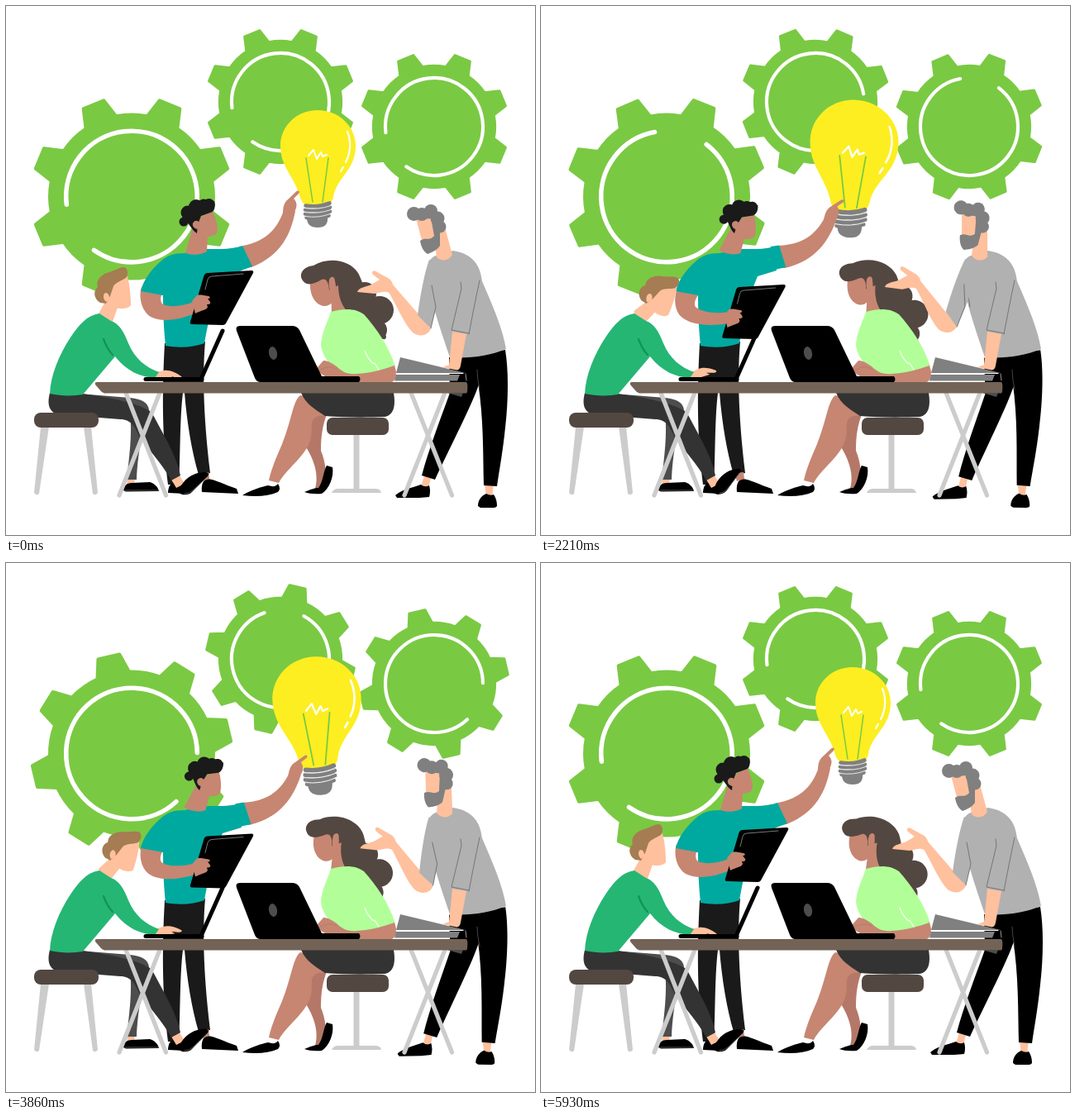
Write an HTML page with a canvas that moves like this. It is 640 px wide and 640 px high and loops after 6000 ms.

```html
<!DOCTYPE html>
<html lang="en">
<head>
<meta charset="utf-8">
<title>Team idea</title>
<style>
  html, body { margin: 0; width: 100%; height: 100%; overflow: hidden; background: #fff; }
  canvas { display: block; width: 640px; height: 640px; }
</style>
</head>
<body>
<canvas id="stage"></canvas>
<script>
const LOOP = 6000, FRAMES = 84, LAST = FRAMES - 1;
const GREEN = '#7ac943', TEAL = '#00a99f', SHIRT = '#25b674', LIME = '#b2ff99';
const DARK = '#c68672', DEEP = '#b57868', LIGHT = '#ffc09d';
const GREY = '#808080', CLOTH = '#b1b1b1', METAL = '#cccccc', BROWN = '#534741';
const TAU = Math.PI * 2, rad = d => d * Math.PI / 180;

const canvas = document.getElementById('stage');
const g = canvas.getContext('2d');
const dpr = window.devicePixelRatio || 1;
canvas.width = canvas.height = 640 * dpr;

// pose values are given at these steps and joined linearly
const KEYS = [0, 11, 21, 31, 45, 63, 83];
let step = 0;
function pose(...v) {
  let i = 0;
  while (i < KEYS.length - 2 && step > KEYS[i + 1]) i++;
  return v[i] + (v[i + 1] - v[i]) * (step - KEYS[i]) / (KEYS[i + 1] - KEYS[i]);
}

const paths = {};
const path = d => paths[d] || (paths[d] = new Path2D(d));
function fill(color, d) {
  g.fillStyle = color;
  g.fill(path(d));
}
function line(color, width, d) {
  g.strokeStyle = color;
  g.lineWidth = width;
  g.lineCap = g.lineJoin = 'round';
  g.stroke(path(d));
}
function dots(color, ...list) {
  g.fillStyle = color;
  for (const [x, y, r] of list) {
    g.beginPath();
    g.arc(x, y, r, 0, TAU);
    g.fill();
  }
}
function turn(x, y, deg, draw, scale = 1) {
  g.save();
  g.translate(x, y);
  g.rotate(rad(deg));
  g.scale(scale, scale);
  g.translate(-x, -y);
  draw();
  g.restore();
}
function shift(x, y, draw) {
  g.save();
  g.translate(x, y);
  draw();
  g.restore();
}

function gear(x, y, size, dir) {
  g.save();
  g.translate(x, y);
  g.scale(size, size);
  g.rotate(dir * TAU * step / LAST);
  g.beginPath();
  for (let i = 0; i < 8; i++) {
    const mid = rad(22.5 + i * 45);
    const at = (r, off) => g.lineTo(r * Math.cos(mid + rad(off)), r * Math.sin(mid + rad(off)));
    at(99, -11.5);
    at(121, -6.3);
    at(121, 6.3);
    at(99, 11.5);
    g.arc(0, 0, 99, mid + rad(11.5), mid + rad(33.5));
  }
  g.closePath();
  g.fillStyle = g.strokeStyle = GREEN;
  g.lineJoin = g.lineCap = 'round';
  g.lineWidth = 4;
  g.fill();
  g.stroke();
  g.beginPath();
  g.arc(0, 0, 79.3, rad(173), rad(125 + 360));
  g.strokeStyle = '#fff';
  g.lineWidth = 5.6;
  g.stroke();
  g.restore();
}

function bulb() {
  fill('#fcee21', 'M377 126C403 126 423 146 423 169C423 199 400 207 396 231C394 241 386 243 377 243C367 243 359 242 356 232C350 207 332 196 332 169C332 146 351 126 377 126Z');
  line(GREEN, 1.5, 'M363 184L371 237M390 184L383 237');
  line('#fff', 2, 'M366 181L372 174L376 185L381 177L383 182L388 180');
  line('#fff', 2.2, 'M413 152C417 162 418 176 411 189M408 195L405 200');
  fill(GREY, 'M364 256L389 254C390 264 386 268 377 268C368 268 364 264 364 256Z');
  line(GREY, 4.6, 'M362.5 241.5Q378 244 391.5 238.5M362 246.5Q378 249 392 243.5M362 251.5Q378 254 392 248.5M363.5 256Q378 258.5 390.5 253.5');
  line('#fff', 0.8, 'M361 244.5Q378 247 393 241.5M361 249.5Q378 252 393 246.5M362 254.5Q378 257 392 251.5');
}

function pointingArm() {
  turn(290, 304, pose(0, -2, 0, 8.5, 14, 1, 0), () => {
    fill(DARK, 'M280 294L287 290C312 285 328 272 336 247L350 248C345 275 333 302 297 316L284 318Z');
    turn(343, 246, pose(0, -14, -13, 2, 6, -6, 0), () =>
      fill(DARK, 'M335 252C335 244 336 239 340 235L351 224.5C354 222 356 225 354 227L348 233C352 237 353 242 349 249L346 256Z'));
    fill(TEAL, 'M276 293L286 290L298 315L282 321Z');
  });
}

function presenter() {
  fill('#1a1a1a', 'M192 408L241 406C238 440 238 490 247 565L233 567C225 540 219 505 216 468L214 468C210 500 211 550 209 579L196 579C190 530 188 480 192 408Z');
  fill('#000', 'M237 588C236 580 238 574 243 572C254 573 264 579 279 584L281 590Z');
  fill(DARK, 'M234 565L245 564L246 572L237 575Z');
  fill('#000', 'M196 589C196 582 199 577 204 576L214 579L216 590Z');

  fill(TEAL, 'M216 299C203 299 194 302 186 310C175 320 166 332 163 345L190 350C190 372 191 393 193 411C209 414 227 413 240 408C245 380 252 350 262 327L285 320L279 292C268 294.500 255 294 243 294Z');

  turn(232, 290, pose(0, 8, 11, 11.5, 12, 12, 0), () => {
    fill(DARK, 'M226 268L217 299C226 302 237 301 243 297L244 278Z');
    fill(DARK, 'M229 260L249 247C253 255 256 264 256 271C256 277 249 279 243 279L232 276Z');
    dots('#1a1a1a', [215, 261, 5.5], [220, 250, 8.5], [230, 243, 9], [239, 240, 6.5], [245.5, 240, 7]);
    fill('#1a1a1a', 'M213 256C222 262 224 271 231 275L232 264L236 254L247 250C252 249 254 243 252 236L230 236Z');
    fill(DARK, 'M226 263C225 266 228 270 232 270L234 262C231 258 227 260 226 263Z');
  });

  const drop = pose(0, 6, 11, 17, 11, 4, 0);
  turn(174, 352, drop * 0.82, () =>
    fill(DARK, 'M164 340C160 352 164 369 175 376C190 384 212 379 231 371L227 358C214 363 199 365 190 361C186 358 187 352 189 346Z'));
  fill(TEAL, 'M163 345L190 350L200 320L180 317C172 325 166 335 163 345Z');
  line('#000', 5, 'M262 393L237 449');
  shift(pose(0, -1, -2, -3.5, -1, 1, 0), drop, () => {
    fill('#000', 'M244 323L297 320Q300 320 299 323L266 384Q265 386 262 386L225 385Q222 385 223 382L239 328Q240 323 244 323Z');
    line('#777', 1, 'M241 343L244 331Q245 327 249 327L287 324');
    fill(DARK, 'M225 357L231 350C234 349 239 350 245 351C248 352 247 354 244 354L247 358C248 361 245 361 243 361L244 364C243 368 236 368 229 372Z');
  });
}

function stoolLeft() {
  fill(METAL, 'M42 509L52 509L40 590Q37 593 34 589ZM94 509L103 509L111 589Q108 593 105 590Z');
}

function sitter() {
  fill(LIGHT, 'M147 571L156 571L155 580L146 580Z');
  fill('#000', 'M142 586C142 580 147 577 152 577L174 576C180 578 184 582 185 587L145 587.5Z');
  line('#777', 0.7, 'M144 586L184 586');
  fill('#4d4d4d', 'M88 469L150 474Q172 476 173 489C165 510 159 545 158 573L146 573C149 545 153 520 150 490Z');
  fill(LIGHT, 'M200 573L210 568L216 578L206 583Z');
  turn(213, 588, pose(0, -4, -8, -9, -2, 1, 0), () => {
    fill('#000', 'M209 589L212 580C218 570 229 564 240 564Q248 564 244 569L225 588Q221 592 213 591Z');
    line('#777', 0.7, 'M216 590Q222 590 226 586L243 570');
  });
  fill('#333', 'M53 468C50 480 51 490 62 494L138 500C152 500 156 510 162 522C175 540 189 554 200 574L211 568C206 543 190 518 176 491C160 481 130 474 92 469Z');
  g.fillStyle = BROWN;
  g.beginPath();
  g.roundRect(34, 492, 78, 18, 8);
  g.fill();

  turn(124, 375, pose(0, 8, 15.5, 24, 26, 12.5, 0), () => {
    fill(LIGHT, 'M121 356L111 374C115 382 123 385 129 382L136 362Z');
    fill(LIGHT, 'M124 338L147 327C150 340 151 352 151 362C148 366 139 368 131 364L120 356Z');
    fill('#a67c52', 'M114 359C106 354 105 345 111 340C108 332 116 324 125 322C134 319 138 316 143 316C148 318 148 325 145 329C139 333 133 334 130 339L126 351L121 360Z');
    fill(LIGHT, 'M119 348C121 345 126 349 125 355L121 358C118 355 117 351 119 348Z');
  });
  turn(184, 447, pose(0, -15, -15, -15, -15, -1, 0), () =>
    fill(LIGHT, 'M179 443L191 441C198 440 205 443 212 448C214 450 211 451 208 450L200 448L204 451L178 452Z'));
  fill(SHIRT, 'M113 372C98 374 88 386 78 401C64 422 54 447 53 469C67 472 81 472 93 470L132 424C146 442 163 449 180 450L185 443C169 437 156 427 148 408C143 395 137 384 127 381Z');
  line('#139355', 2.2, 'M118 403C121 411 124 417 129 422');
}

function womanLegs() {
  fill(DEEP, 'M370 496C360 510 357 522 362 532C372 548 379 566 374 584L384 586C389 570 387 552 381 538C381 520 383 508 388 494Z');
  fill('#000', 'M361 588C368 585 374 583 378 583C384 575 384 562 388 556L395 558C397 570 391 584 382 590Q369 591 361 588Z');
  fill(DARK, 'M356 471C347 478 346 500 334 530C327 546 321 560 318 574L330 577C339 560 362 545 368 526C373 510 365 500 378 496L392 495L375 475Z');
  fill('#000', 'M286 592C297 585 309 582 317 580Q326 583 329 578Q333 584 329 588C318 593 303 594 286 592Z');
  fill('#333', 'M357 468C363 482 374 488 386 496C408 498 437 498 458 497C471 495 471 480 469 468Z');
  line(METAL, 7, 'M424 520L424 584');
  fill(METAL, 'M394 589Q396 584 402 584L447 584Q453 584 454 589Z');
  g.fillStyle = BROWN;
  g.beginPath();
  g.roundRect(388, 498, 75, 21, 7);
  g.fill();
}

function woman() {
  turn(402, 365, pose(0, 2.2, 3.6, 5.5, 7, 9.5, 10), () => {
    dots(BROWN, [452, 368, 17], [449, 392, 12], [434, 348, 14], [428, 366, 17]);
    fill(BROWN, 'M357 328C356 319 364 315 372 314C390 303 416 307 426 323C431 332 431 340 440 345L455 385L460 400Q460 405 453 402C433 395 418 381 411 368L398 350Z');
    fill(DARK, 'M393 342L394 372L411 368C405 359 402 350 402 338Z');
    fill(DARK, 'M368 334C367 350 374 361 384 363C392 364 398 357 399 346L394 326Z');
    fill(BROWN, 'M357 328C361 340 371 337 380 332C386 328 390 332 391 343L396 344L400 325L375 314Z');
    fill(DARK, 'M391 331C393 326 398 327 398 333C400 340 399 347 395 348C391 344 390 337 391 331Z');
  });
  fill(LIME, 'M393 370C388 385 382 395 381 410C383 427 396 439 410 446C430 449 452 443 471 436C463 411 448 390 433 373C424 366 410 365 393 370Z');
  fill(DARK, 'M377 437L384 429Q389 428 400 436C407 443 414 446 424 445C442 444 456 440 470 435C474 446 472 452 467 455L398 455L376 442Z');
  line(DEEP, 0.8, 'M380 440Q391 434 400 439');
  line('#fff', 1.1, 'M434 417Q438 428 445 433M446 432L451 440');
}

function table() {
  line(METAL, 5.2, 'M145 468L193.5 592M186 468L137 592M490 468L539.5 592M531 468L482 592');
  fill('#736357', 'M110 455L557 455Q559 456 558 467L557 468.5L119 468.5Q116 468 114 465L108 458Q107 455 110 455Z');
  line('#000', 5, 'M169 451.5L237 451.5');
}

function laptop() {
  fill('#000', 'M283 387L346 387Q352 387 355 392L382 448L427 448Q430 451.5 427 455L308 455Q303 455 301 450L279 393Q277 387 283 387Z');
  g.fillStyle = '#4d4d4d';
  g.beginPath();
  g.ellipse(323, 420, 5, 8, -0.2, 0, TAU);
  g.fill();
}

function books() {
  fill(GREY, 'M477 425L556 444L472 444Z');
  fill(GREY, 'M472 446L549 446L546 453.5L470 453.5Z');
  line('#fff', 1, 'M472 444.5L553 444.5');
  line('#999', 1, 'M556 445L557 453');
}

function elderLegs() {
  const spread = pose(0, 0.4, 0.7, 0.9, 1.1, 0.7, 0);
  turn(590, 430, spread, () => {
    fill(LIGHT, 'M579 578L590 578L588 594L581 594Z');
    fill('#000', 'M571 605C571 597 576 592 581 590Q586 593 590 591C593 595 594 600 594 605Q593 607 590 607L574 607Z');
    fill('#000', 'M552 424L604 416C608 440 608 475 604 510C601 540 597 560 594 581L578 580C577 540 578 500 571 455Z');
  });
  turn(580, 430, -spread, () => {
    fill(LIGHT, 'M506 568L514 571L511 583L502 582Z');
    fill('#000', 'M471 592C477 586 490 583 502 579Q507 583 512 580Q514 587 512 594L500 595L473 595Z');
    fill('#000', 'M536 425L590 420L572 458C564 482 540 528 519 573L503 568C511 538 524 504 537 468Z');
  });
  line('#555', 0.8, 'M570 440Q570 450 573 464');
}

function elder() {
  fill('#4d4d4d', 'M534 468L553 468L551 473Z');
  fill(CLOTH, 'M520 302C512 305 509 313 510 322C511 350 524 386 537 425C560 427 586 423 605 415C601 391 590 365 576 333C574 315 566 300 541 296Z');
  turn(530, 303, pose(0, 6, 11.5, 15, 15, 11, 0), () => {
    fill(LIGHT, 'M516 270L531 268L540 301C535 309 526 309 521 304Z');
    fill(LIGHT, 'M496 257L520 252L526 280L504 287Z');
    dots(GREY, [493.5, 251.5, 8.5], [503, 252, 8], [514, 248, 8], [522, 257, 8.5], [525, 267, 7.5]);
    fill(GREY, 'M492 246L512 246L524 256L524 268L517 257L497 258Z');
    fill(GREY, 'M514 256L525 272L525 290C521 296 515 298 510 300C505 297 502 291 501 284C508 279 512 285 518 278Z');
  });
  line('#666', 0.8, 'M550 334L551 342L539 392L560 396M573 332C568 355 564 376 560 397');
  line('#666', 0.8, 'M515 338L519 364');
  fill(LIGHT, 'M540 394L557 397L550 435Q549 442 543 440L528 437L536 434Z');
}

function elderArm() {
  const upper = pose(0, 5, 8.5, 8.5, -0.5, -3.5, 0);
  const lower = pose(0, 1, 2, 2, 1.5, 0.5, 0);
  turn(520, 316, upper, () => {
    turn(503, 390, lower - upper, () => {
      fill(LIGHT, 'M467 336L500 374L514 390C511 399 500 401 492 395C482 385 474 365 463 346Z');
      fill(LIGHT, 'M425 346C427 340 436 340 442 337L452 331L444 325C441 321 445 319 449 322L462 329C467 332 469 337 468 341L464 347C457 344 452 347 446 348Z');
    });
    fill(CLOTH, 'M512 307C507 320 501 350 498 374L514 390L523 355L526 318Z');
    line('#666', 0.8, 'M515 338L520 364L514 390');
  });
}

function draw() {
  g.setTransform(dpr, 0, 0, dpr, 0, 0);
  g.fillStyle = '#fff';
  g.fillRect(0, 0, 640, 640);
  gear(152, 230.5, 1, 1);
  gear(332, 116, 0.744, -1);
  gear(518, 146, 0.744, 1);
  turn(377, 197, pose(0, 2.6, 5, 2.6, -0.6, -5, 0), bulb, pose(1, 1.06, 1.12, 1.175, 1.24, 1.12, 1));
  pointingArm();
  presenter();
  stoolLeft();
  sitter();
  womanLegs();
  elderLegs();
  woman();
  table();
  laptop();
  books();
  elder();
  elderArm();
}

let start;
function tick(now) {
  start ??= now;
  step = Math.floor(((now - start) % LOOP + 5) * FRAMES / LOOP) % FRAMES;
  draw();
  requestAnimationFrame(tick);
}
requestAnimationFrame(tick);
</script>
</body>
</html>
```
